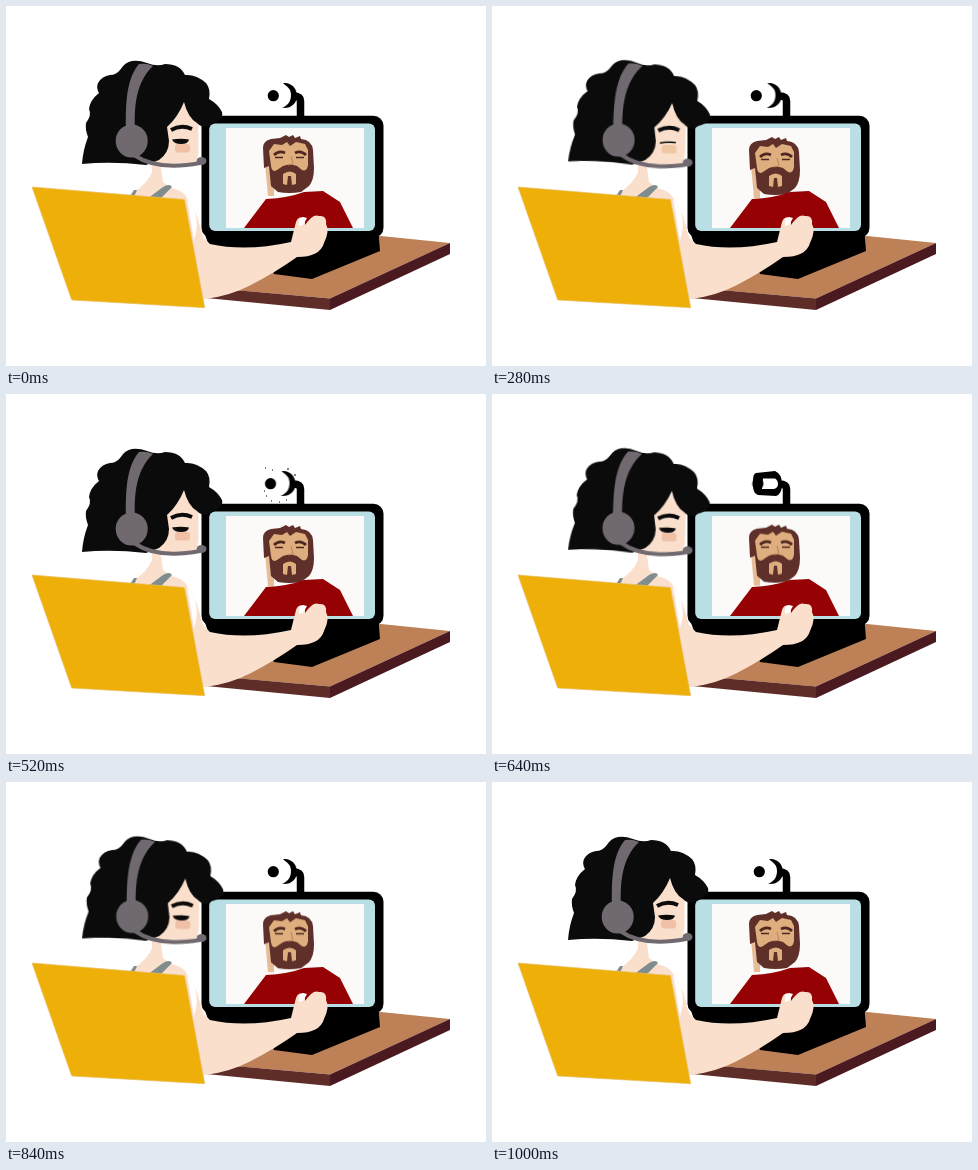
An HTML page for the animation above (1.04 s loop, 480 by 360 pixels).

```html
<!DOCTYPE html>
<html lang="en">
<head>
<meta charset="utf-8">
<title>Video call</title>
<style>
html, body { margin: 0; width: 100%; height: 100%; overflow: hidden; background: #fff; }
svg { display: block; width: 100vw; height: 100vh; }
.skin { fill: #f9dfcc; }
.grey { fill: #706a70; }
.brown { fill: #5f3029; }
.tan { fill: #deae7e; }
#head, #man, #lens, #crescent, .blink, .wide, #cheek, #turn, #front, #specks {
  animation: 1040ms linear infinite;
}
#head { transform-origin: 150px 160px; animation-name: sway; }
#man { animation-name: bob; animation-timing-function: ease-in-out; }
#lens { animation-name: look; }
#crescent { animation-name: follow; }
#cheek { animation-name: blush; }
.wide { animation-name: wide; animation-timing-function: step-end; }
.blink { animation-name: blink; animation-timing-function: step-end; }
#front { animation-name: front; animation-timing-function: step-end; }
#turn { animation-name: turn; animation-timing-function: step-end; }
#specks { animation-name: specks; animation-timing-function: step-end; }
@keyframes sway {
  0%, 50%, 96.2%, 100% { transform: rotate(0deg); }
  11.5% { transform: rotate(1.1deg); }
  25% { transform: rotate(2.15deg); }
  38.5% { transform: rotate(1.2deg); }
  61.5% { transform: rotate(1.7deg); }
  69% { transform: rotate(2.1deg); }
  80.8% { transform: rotate(1.2deg); }
}
@keyframes bob {
  0%, 90%, 100% { transform: translateY(0); }
  27%, 50% { transform: translateY(2px); }
}
@keyframes look {
  0%, 80%, 100% { transform: translateX(0); }
  27%, 48% { transform: translateX(-3px); }
  61.5% { transform: translateX(-1.5px); }
}
@keyframes follow {
  0%, 80%, 100% { transform: translateX(0); }
  27%, 50% { transform: translateX(-1.5px); }
}
@keyframes blush {
  0%, 50%, 100% { fill: #efc0a5; }
  11.5% { fill: #efcba5; }
}
@keyframes wide { 0%, 42.2% { opacity: 1; } 7.6% { opacity: 0; } }
@keyframes blink { 0%, 42.2% { opacity: 0; } 7.6% { opacity: 1; } }
@keyframes front { 0%, 73% { opacity: 1; } 57.6% { opacity: 0; } }
@keyframes turn { 0%, 73% { opacity: 0; } 57.6% { opacity: 1; } }
@keyframes specks { 0%, 57.6% { opacity: 0; } 46% { opacity: 1; } }
</style>
</head>
<body>
<svg viewBox="0 0 480 360">
  <!-- desk -->
  <path fill="#bd8057" d="M370 229.500 444 237 324 292.500 205 282 262 255Z"/>
  <path fill="#5f2d28" d="M200 281.500 324 292.500V304L200 292Z"/>
  <path fill="#4b1a20" d="M324 292.500 444 237V248L324 304Z"/>

  <!-- monitor -->
  <path d="M196 220H372L374 245 306 273 268 268 262 250 205 246Z"/>
  <rect x="195.500" y="109.700" width="182" height="122" rx="10"/>
  <rect x="203.200" y="117.500" width="165.800" height="107.500" rx="6" fill="#b9dfe4"/>
  <rect x="220" y="122" width="138" height="100" fill="#fbfaf9"/>

  <!-- webcam -->
  <path d="M294.500 111V95Q294.500 90 287 90" fill="none" stroke="#000" stroke-width="7.500"/>
  <g id="front">
    <path id="crescent" d="M277 77C286 76 291 83 291 90S285 103 276 102C281 100 285 96 285 89S281 81 277 77Z"/>
  </g>
  <path id="turn" fill-rule="evenodd" d="M264 79 283 77Q290 80 290 90T284 102L266 101Q261 99 261 92V86Q261 80 264 79ZM271 84.500H283Q286 86 286 90T282 95H270Z"/>
  <circle id="lens" cx="267.300" cy="89.700" r="5.600"/>
  <path id="specks" fill="none" stroke="#000" d="M259 74h1M266 76h1M281 75h2M288 81h2M260 102h1M265 107h1M273 108h1M280 106h1M258 97h1"/>

  <!-- caller -->
  <g id="man">
    <path fill="#e6bd97" d="M259 158H268V190H262Z"/>
    <path class="brown" d="M258 162 257 142Q257 135 265 133L274 132 280 129 283 131 287 129 289 132 294 130 295 133Q306 134 307 144L308 162Q308 174 303 180L295 186Q283 188 272 186L265 180 263 160Z"/>
    <path class="tan" d="M263 145 268 138 276 139 281 136 284 140 290 136 299 138 302 144V159Q301 166 296 164L291 160Q284 157 277 160L271 164Q266 167 265 160Z"/>
    <path class="tan" d="M277 178V168Q284 163 290 168V178L286 179 285 170H282L281 179Z"/>
    <path d="M268 149Q273 144 279 147M289 147Q295 144 300 149" fill="none" stroke="#4e2820" stroke-width="2.800"/>
    <path d="M269 151.500H277M290 151.500H298" stroke="#4e2820" stroke-width="1.400"/>
    <path d="M285 150 287 158 282 159" fill="none" stroke="#b9835f"/>
  </g>
  <path fill="#960204" d="M238 222 260 193Q282 192 298 186L317 185 334 196 347 222Z"/>

  <!-- body and arm -->
  <path class="skin" d="M146 155H154L157 176 165 182Q177 184 182 193L191 210 197 231 204 238Q240 246 285 236L290 216Q293 208 299 214V219Q307 207 313 210 321 209 320 218 324 225 318 237 314 251 291 251 270 266 245 279 224 290 199 293L160 292 127 187Q142 177 146 166Z"/>
  <path d="M181 192 189 206Q193 220 188 234Z" fill="#fff"/>
  <path d="M293 220Q292 211 297 211L301 212 297 219Z" fill="#fff"/>
  <path fill="#7f8d8f" d="M141 193 157 181Q164 177 166 181L153 194ZM124 190 128 184H131L128 191Z"/>

  <g id="head">
    <path class="skin" d="M142 140 160 90H182L192.500 118V147Q191 158 183 160L160 161 138 157Z"/>
    <path fill="#0b0b0b" d="M126 55Q119 56 114 64 110 69 104 69 96 70 92 77 90 82 93 87 84 94 83 103 86 109 80 117 79 123 82 131 77 144 76 158Q106 155 140 159L153 154Q163 147 163 135L161 121Q172 111 178 96 182 112 191 117 198 124 205 118 218 114 216 106 212 98 203 93 205 83 200 77 190 68 179 69 174 58 159 58 151 61 141 57 133 54 126 55Z"/>
    <path d="M165 124Q175 118 186 123" fill="none" stroke="#0b0b0b" stroke-width="3.800"/>
    <rect id="cheek" x="169" y="138" width="15" height="8.500" rx="3"/>
    <path class="wide" fill="#0b0b0b" d="M166 133.500Q175 132 183 133.500 182 138 175 138T166 133.500Z"/>
    <path class="blink" d="M167 136.500Q174 134.500 183 135.500" fill="none" stroke="#0b0b0b" stroke-width="1.500"/>
    <path class="grey" d="M133 58C123 70 119 88 120 124H129C128 100 130 76 147 60Q141 57 133 58Z"/>
    <ellipse class="grey" cx="125.700" cy="135" rx="16" ry="16.500"/>
    <path d="M128 149Q151 165 194 157" fill="none" stroke="#706a70" stroke-width="4"/>
    <ellipse class="grey" cx="195.500" cy="155" rx="5" ry="4"/>
  </g>

  <!-- chair -->
  <path fill="#eeb008" stroke="#e9bd62" stroke-width=".7" d="M26 181 178.500 193.500 198.700 301.700 65.700 294Z"/>
</svg>
</body>
</html>
```
